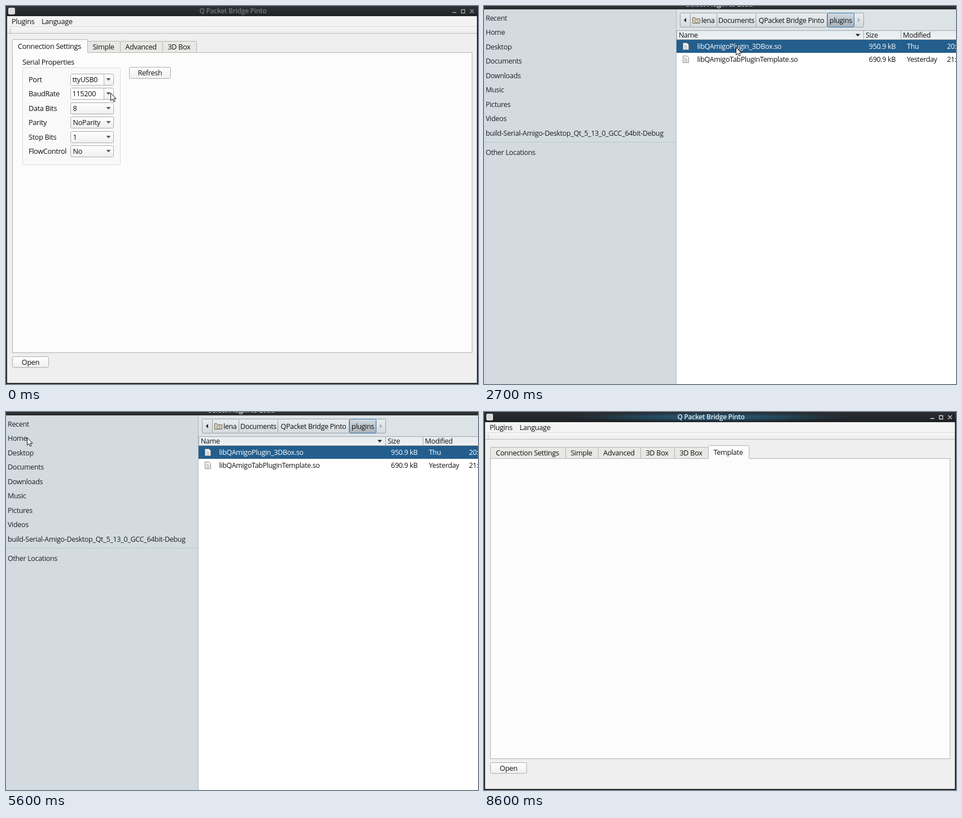
An HTML page that plays this animation: 836 px wide and 670 px high, repeating every 8.8 s.

```html
<!DOCTYPE html>
<html lang="en">
<head>
<meta charset="utf-8">
<title>Plugin loading</title>
<style>
  html, body { margin: 0; width: 100%; height: 100%; overflow: hidden; background: #efefef; }
  svg { display: block; }
  text { font: 12.7px "Open Sans", "Noto Sans", sans-serif; letter-spacing: -.32px; white-space: pre; }
  .title { font-weight: 600; font-size: 12px; letter-spacing: -.3px; }
  .gtk text { font-size: 12.5px; letter-spacing: -.33px; }
</style>
</head>
<body>
<svg id="stage" width="836" height="670" viewBox="0 0 836 670" xmlns="http://www.w3.org/2000/svg"></svg>
<script>
const LOOP = 8800, STEP = 100;
const APP = 'Q Packet Bridge Pinto', USER = 'lena';

// ---- drawing helpers (boxes are given by their edges) ----
const fillBox = (x, y, x2, y2, fill, more = '') =>
  `<rect x="${x}" y="${y}" width="${x2 - x}" height="${y2 - y}" fill="${fill}" ${more}/>`;
const box = (x, y, x2, y2, fill, stroke, r = 0) =>
  fillBox(x + .5, y + .5, x2 - .5, y2 - .5, fill, `stroke="${stroke}" rx="${r}"`);
const text = (x, y, s, fill = '#111', more = '') =>
  `<text x="${x}" y="${y}" fill="${fill}" ${more}>${s}</text>`;
const mid = (x, y, s, fill, more = '') => text(x, y, s, fill, `text-anchor="middle" ${more}`);
const end = (x, y, s, fill) => text(x, y, s, fill, 'text-anchor="end"');
const path = (d, more) => `<path d="${d}" ${more}/>`;
const group = (id, body, more = '') => `<g id="${id}" ${more}>${body}</g>`;
const ramp = (id, a, b) => `<linearGradient id="${id}" x2="0" y2="1">
  <stop stop-color="${a}"/><stop offset="1" stop-color="${b}"/></linearGradient>`;
const down = (x, y, fill) => path(`M${x - 4} ${y - 2}h8l-4 4.5z`, `fill="${fill}"`);

const defs = `<defs>
  ${ramp('idle', '#303336', '#202326')}
  ${ramp('live', '#2b2f33', '#1c2024')}
  ${ramp('button', '#ffffff', '#efefee')}
  ${ramp('bar', '#f8f7f7', '#ececec')}
  ${ramp('crumb', '#e9edef', '#d3dade')}
  ${ramp('pressed', '#d3dbe1', '#a6b1ba')}
  ${ramp('head', '#e6ebee', '#eff2f4')}
  <radialGradient id="glow"><stop stop-color="#2a607f"/>
    <stop offset=".5" stop-color="#24506b" stop-opacity=".75"/>
    <stop offset="1" stop-color="#22445a" stop-opacity="0"/></radialGradient>
</defs>`;

// ---- main window ----
function titleBar(active) {
  const ink = active ? '#d5d9dc' : '#a0a3a5';
  return fillBox(0, 0, 836, 18, `url(#${active ? 'live' : 'idle'})`) +
    (active ? fillBox(150, 0, 655, 18, 'url(#glow)') : '') +
    fillBox(4, 3, 16, 15, '#d9dadb', 'rx="2.5"') +
    mid(402, 13, APP, active ? '#e3e7e9' : '#74777a', 'class="title"') +
    path('M790.5 11.5h7M806.5 6.5h6v6h-6zM822 6l6.5 6.5M828.5 6l-6.5 6.5',
      `fill="none" stroke="${ink}" stroke-width="1.3"`);
}

const button = (x, y, x2, y2, s) =>
  box(x, y, x2, y2, 'url(#button)', '#adadad', 2) + mid((x + x2) / 2, y + 14.5, s);

function chrome() {
  let dots = '';
  for (let y = 39; y < 48; y += 2) dots += fillBox(6, y, 7, y + 1, '#b5b5b5') + fillBox(8, y, 9, y + 1, '#b5b5b5');
  return fillBox(0, 0, 836, 670, '#2b2d2f') +
    fillBox(2, 18, 834, 668, '#efefef') +
    fillBox(2, 18, 834, 36, '#f4f3f3') +
    fillBox(2, 36, 834, 49, 'url(#bar)') +
    fillBox(2, 36, 834, 37, '#dadada') + fillBox(2, 48, 834, 49, '#bcbcbc') + dots +
    box(11, 82, 826, 615, '#fcfcfc', '#b1b1b1') +
    button(11, 621, 76, 641, 'Open');
}

const TABS = [['Connection Settings', 11, 144], ['Simple', 144, 202], ['Advanced', 202, 277],
  ['3D Box', 277, 337], ['3D Box', 337, 397], ['Template', 397, 469]];

function tabRow(count, sel) {
  return TABS.slice(0, count).map(([name, x, x2], i) => {
    const on = i === sel, top = on ? 59 : 62;
    return box(x, top, x2 + 1, 83, on ? '#fcfcfc' : '#e8e8e5', '#b5b5b5', 1) +
      (on ? fillBox(x + 1, 80, x2, 84, '#fcfcfc') : '') +
      mid((x + x2) / 2 - .5, on ? 75.5 : 76.5, name);
  }).join('');
}

function settings() {
  const rows = [['Port', 'ttyUSB0'], ['BaudRate', '115200'], ['Data Bits', '8'],
    ['Parity', 'NoParity'], ['Stop Bits', '1'], ['FlowControl', 'No']];
  const fields = rows.map(([label, value], i) => {
    const y = Math.round(119.5 + i * 25.5), edit = i < 2;
    return text(40, y + 14.5, label) +
      box(114, y, 191, y + 21, 'url(#button)', '#adadad', 2) +
      (edit ? fillBox(115, y + 1, 174, y + 20, '#fff') + fillBox(173, y + 1, 174, y + 20, '#b5b5b5') : '') +
      text(edit ? 117.5 : 118.5, y + 14.5, value) +
      down(181.5, y + 10, '#5a5a5a');
  }).join('');
  return text(29, 104, 'Serial Properties') +
    box(29, 109, 203, 282, '#f9f9f9', '#dcdcdc', 1) + fields +
    button(218, 108, 292, 129, 'Refresh');
}

const cube = () => fillBox(20, 91, 816, 607, '#000') +
  fillBox(288, 219, 547, 478, '#8f8f8f') +
  fillBox(333, 262, 503, 432, '#919191') +
  fillBox(358, 284, 478, 407, '#939393') +
  fillBox(381, 309, 454, 383, '#959593');

const menu = () => fillBox(4, 36, 127, 63, '#000', 'opacity=".12" rx="2"') +
  box(6, 36, 124, 60, '#f6f6f6', '#a9a9a9') +
  group('item', fillBox(8, 38, 122, 58, '#308cc6')) +
  group('itemText', text(29, 52.5, 'Load Plugin', 'currentColor'));

// ---- file dialog ----
function fileRow(y, name, size, day, hour, fill, ink) {
  return fillBox(341, y, 836, y + 23, fill) +
    path(`M352.5 ${y + 5.5}h7l3 3v9h-10z`, 'fill="#f4f4f4" stroke="#8b8b8b"') +
    path(`M354.5 ${y + 9.5}h4m-4 2h6m-6 2h6m-6 2h6`, 'stroke="#b3b3b3" fill="none"') +
    text(377.5, y + 16, name, ink) + end(729, y + 16, size, ink) +
    text(749, y + 16, day, ink) + text(820, y + 16, hour, ink);
}
const row1 = (fill, ink) => fileRow(60, 'libQAmigoPlugin_3DBox.so', '950.9 kB', 'Thu', '20:', fill, ink);
const row2 = (fill, ink) => fileRow(83, 'libQAmigoTabPluginTemplate.so', '690.9 kB', 'Yesterday', '21:', fill, ink);

function dialog() {
  const places = ['Recent', 'Home', 'Desktop', 'Documents', 'Downloads', 'Music', 'Pictures', 'Videos',
    'build-Serial-Amigo-Desktop_Qt_5_13_0_GCC_64bit-Debug'];
  const crumbs = [['', 347, 366], [USER, 365, 413], ['Documents', 412, 482],
    [APP.replace(' ', ''), 481, 608], ['', 655, 673], ['plugins', 608, 656]];
  const blue = '#235e8d', line = '#a2abb0';
  return fillBox(0, 0, 836, 670, '#fff') +
    fillBox(0, 0, 341, 670, '#d3dbe0') + fillBox(340, 6, 341, 670, '#b1bac0') +
    fillBox(341, 6, 836, 43, '#dce3e6') +
    fillBox(0, 0, 836, 6, '#2c2e30') +
    mid(417, 1, 'Select Plugin to Load', '#dfe3e5', 'class="title"') +
    places.map((s, i) => text(3, 25.5 + i * 25.5, s, '#1b2126')).join('') +
    fillBox(0, 241, 340, 242, '#bec7cc') + text(3, 263.5, 'Other Locations', '#1b2126') +
    crumbs.map(([s, x, x2]) => {
      const on = s === 'plugins';
      return box(x, 12, x2, 38, on ? 'url(#pressed)' : 'url(#crumb)', on ? '#3574ad' : '#98a3a9', 1) +
        (s === USER ? end(408.5, 30, s) : mid((x + x2) / 2, 30, s));
    }).join('') +
    path('M358 21v8l-4-4z', 'fill="#222"') + path('M662 21v8l4-4z', 'fill="#a5adb1"') +
    path('M369.5 20.5h4l1 2h8v8h-13z', 'fill="#d2ccb8" stroke="#77715f"') +
    '<circle cx="376" cy="27" r="2.5" fill="#efeadb" stroke="#77715f"/>' +
    box(341, 43, 837, 60, 'url(#head)', line) +
    fillBox(672, 44, 673, 59, line) + fillBox(738, 44, 739, 59, line) +
    text(345, 56, 'Name') + text(676, 56, 'Size') + text(742, 56, 'Modified') +
    down(662, 51.5, '#222') +
    group('first', row1(blue, '#fff') + row2('#fff', '#111')) +
    group('second', row1('#fff', '#111') + row2(blue, '#fff')) +
    group('hover', row2('#f1f4f6', '#111'));
}

const pointer = path('M-.5-.5v13.5l3.2-3 2.2 4.8 2.1-1-2.2-4.5h4.2z',
  'fill="#fff" stroke="#111" stroke-linejoin="round"');

const stage = document.getElementById('stage');
stage.innerHTML = defs + chrome() +
  group('idleBar', titleBar(false)) + group('liveBar', titleBar(true)) +
  group('lit', fillBox(7, 19, 54, 36, '#308cc6')) +
  group('plugins', text(10, 31.5, 'Plugins', 'currentColor')) + text(63, 31.5, 'Language') +
  group('tabsA', tabRow(4, 0) + settings()) +
  group('tabsB', tabRow(5, 4) + cube()) +
  group('tabsC', tabRow(6, 5)) +
  group('menu', menu()) +
  group('dialog', dialog(), 'class="gtk"') +
  group('pointer', pointer);

// ---- motion: start time, number of steps, end point ----
const START = [186, 155];
const MOVES = [
  [100, 6, 36, 27], [900, 3, 35, 44],
  [1400, 1, 36, 46], [1500, 1, 56, 42], [1600, 3, 112, 120], [1900, 4, 43, 214],
  [2300, 2, 447, 90], [2700, 1, 447, 74],
  [3800, 2, 229, 130], [4100, 3, 50, 87], [4600, 3, 13, 26], [5000, 4, 35, 44],
  [5600, 1, 38, 46], [5800, 4, 428, 104], [6300, 1, 441, 97],
  [7700, 3, 624, 427], [8000, 5, 121, -10], [8600, 1, 121, -40]
];

function pointerAt(t) {
  let [x, y] = START;
  for (const [t0, n, tx, ty] of MOVES) {
    if (t < t0) break;
    const k = Math.min(n, Math.floor((t - t0) / STEP) + 1) / n;
    x += (tx - x) * k;
    y += (ty - y) * k;
  }
  return [Math.round(x), Math.round(y)];
}

const el = id => document.getElementById(id);
const show = (id, on) => { el(id).style.display = on ? '' : 'none'; };
const ink = (id, on) => { el(id).style.color = on ? '#fff' : '#111'; };

function draw(t) {
  const within = (...spans) => spans.some(([a, b]) => t >= a && t < b);
  const [x, y] = pointerAt(t);
  const lit = within([800, 1400], [5000, 5600]);
  const item = y > 37;
  show('idleBar', t < 800);
  show('liveBar', t >= 800);
  show('lit', lit);
  ink('plugins', lit);
  show('tabsA', t < 3300);
  show('tabsB', within([3300, 6800]));
  show('tabsC', t >= 6800);
  show('menu', within([800, 1100], [5000, 5500]));
  show('item', item);
  ink('itemText', item);
  show('dialog', within([1400, 3300], [5600, 6800]));
  show('first', t < 6300);
  show('second', t >= 6300);
  show('hover', within([2400, 2700], [6100, 6300]));
  el('pointer').setAttribute('transform', `translate(${x} ${y})`);
}

const t0 = performance.now();
function tick(now) {
  draw(Math.max(0, now - t0) % LOOP);
  requestAnimationFrame(tick);
}
draw(0);
requestAnimationFrame(tick);
</script>
</body>
</html>
```
